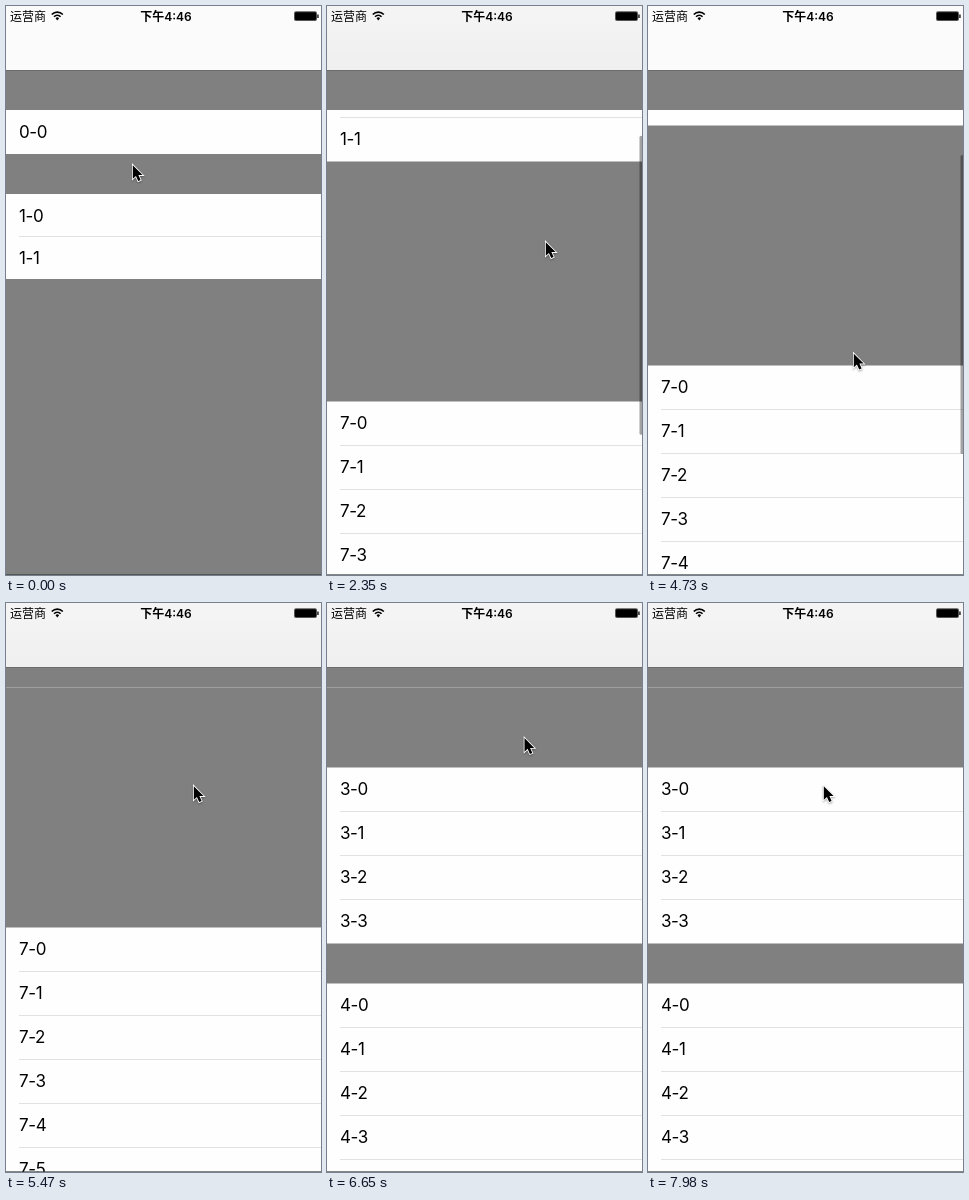
Write an HTML page with a canvas that moves like this. It is 315 px wide and 569 px high and loops after 8 s.

```html
<!DOCTYPE html>
<html lang="zh">
<head>
<meta charset="utf-8">
<style>
html, body { margin: 0; width: 100%; height: 100%; overflow: hidden; background: #808080; }
canvas { display: block; width: 315px; height: 569px; }
</style>
</head>
<body>
<canvas id="stage" width="315" height="569"></canvas>
<script>
const ctx = document.getElementById('stage').getContext('2d');
const W = 315, H = 569, LOOP = 8000, TICK = 147.8;
const NAV = 64, HEADER = 40, ROW = 44, SECTIONS = 10, TOGGLE_TICKS = 2;
const CJK = '"Noto Sans CJK SC", "Noto Sans CJK", sans-serif';

const smooth = x => { x = Math.min(1, Math.max(0, x)); return x * x * (3 - 2 * x); };

// Eases through moves of the form [start, end, ...values], in ticks.
const follow = (tick, from, moves) => moves.reduce((now, [start, end, ...to]) => {
  const f = smooth((tick - start) / (end - start));
  return now.map((v, i) => v + (to[i] - v) * f);
}, from);

const cursorAt = tick => follow(tick, [126, 158], [
  [0, 4.5, 200, 490],   // open section 7
  [7, 16, 218, 235],    // drag the list
  [16, 20, 200, 421],
  [20, 24, 205, 382],
  [31, 33, 205, 311],   // drag again
  [34, 37, 187, 182],   // open section 4
  [39, 42, 196, 148],   // open section 3
  [43, 48, 198, 108],   // open and close section 2
  [51, 54, 175, 182]
]);

const scrollAt = tick => follow(tick, [0], [[9, 16, 120.5], [31, 32.98, 191.5]])[0];
const barAlphaAt = tick => smooth(tick - 9) * smooth((36 - tick) / 2);
const navTintAt = tick => follow(tick, [0], [[9, 16, 1], [31, 32, 0], [32, 33, 1]])[0];

const openAt = { 1: -1.78, 2: 48.14, 3: 42.5, 4: 37.27, 7: 5 };
const closeAt = { 2: 51 };

function openness(section, tick) {
  if (section === 0) return 1;
  const progress = start => start === undefined ? 0 : smooth((tick - start) / TOGGLE_TICKS);
  return progress(openAt[section]) - progress(closeAt[section]);
}

function rect(color, x, y, w, h, radius = 0) {
  ctx.fillStyle = color;
  ctx.beginPath();
  ctx.roundRect(x, y, w, h, radius);
  ctx.fill();
}

function text(string, x, y, font, align = 'left', spacing = 0) {
  ctx.font = font;
  ctx.textAlign = align;
  ctx.letterSpacing = `${spacing}px`;
  ctx.fillStyle = '#000';
  ctx.fillText(string, x, y);
}

function drawRows(section, top, open) {
  const count = section + 1, height = count * ROW * open;
  rect('#fefefe', 0, top, W, height);
  ctx.save();
  ctx.beginPath();
  ctx.rect(0, top, W, height);
  ctx.clip();
  for (let i = 0; i < count; i++) {
    const y = top + i * ROW * open;
    if (i) rect('#c8c7cc', 13, y - 0.5, W, 0.5);
    text(`${section}-${i}`, 13, Math.floor(y + 28), '17px Inter, sans-serif', 'left', -0.4);
  }
  ctx.restore();
  return height;
}

function drawTable(tick, scroll) {
  rect('#808080', 0, 0, W, H);
  let y = NAV - scroll, stickyBottom = NAV;
  for (let section = 0; section < SECTIONS; section++) {
    const top = y, open = openness(section, tick);
    y += HEADER;
    if (open > 0) y += drawRows(section, y, open);
    if (top < NAV && y > NAV) stickyBottom = Math.min(NAV + HEADER, y);
  }
  rect('#808080', 0, NAV, W, stickyBottom - NAV);
}

function drawStatusBar(tint) {
  const shade = ctx.createLinearGradient(0, 0, 0, NAV);
  const grey = level => `rgb(${level},${level},${level})`;
  shade.addColorStop(0.2, grey(251 - 7 * tint));
  shade.addColorStop(0.8, grey(251 - 11 * tint));
  rect(shade, 0, 0, W, NAV);
  rect('#6c6c6c', 0, NAV, W, 1);

  text('运营商', 4, 14.5, '12px ' + CJK);
  text('下午4:46', 160, 14.5, '600 12px Inter, ' + CJK, 'center');

  const wifiArc = radius => ctx.arc(51.3, 14, radius, -Math.PI * 0.75, -Math.PI * 0.25);
  ctx.strokeStyle = '#000';
  ctx.lineWidth = 1.7;
  for (const radius of [4.6, 7.8]) {
    ctx.beginPath();
    wifiArc(radius);
    ctx.stroke();
  }
  ctx.beginPath();
  ctx.moveTo(51.3, 14.4);
  wifiArc(2.5);
  ctx.fill();

  rect('#555', 288, 5.3, 23, 9.6, 2);
  rect('#000', 289, 6.2, 21, 7.8, 1);
  rect('#000', 311.3, 8.5, 1.3, 3.5);
}

function drawScrollBar(alpha, scroll) {
  rect(`rgba(0,0,0,${0.36 * alpha})`, 312.5, 66 + 0.53 * scroll, 3, 299, 1.5);
}

function drawCursor(x, y) {
  ctx.save();
  ctx.translate(x + 0.8, y + 1.2);
  ctx.scale(0.95, 0.95);
  const arrow = new Path2D('M0 0V14.3L3.3 11.3L5.7 16.7L8.2 15.6L5.9 10.4H10.3Z');
  ctx.shadowColor = 'rgba(0,0,0,.35)';
  ctx.shadowBlur = 2;
  ctx.shadowOffsetY = 1;
  ctx.lineWidth = 1.8;
  ctx.strokeStyle = '#fff';
  ctx.stroke(arrow);
  ctx.shadowColor = 'transparent';
  ctx.fillStyle = '#000';
  ctx.fill(arrow);
  ctx.restore();
}

function frame() {
  const tick = Math.floor((performance.now() % LOOP + 18) / TICK);
  const scroll = scrollAt(tick);
  drawTable(tick, scroll);
  drawStatusBar(navTintAt(tick));
  drawScrollBar(barAlphaAt(tick), scroll);
  rect('rgba(50,60,55,.6)', 0, H - 1, W, 1);
  drawCursor(...cursorAt(tick));
  requestAnimationFrame(frame);
}
frame();
</script>
</body>
</html>
```
